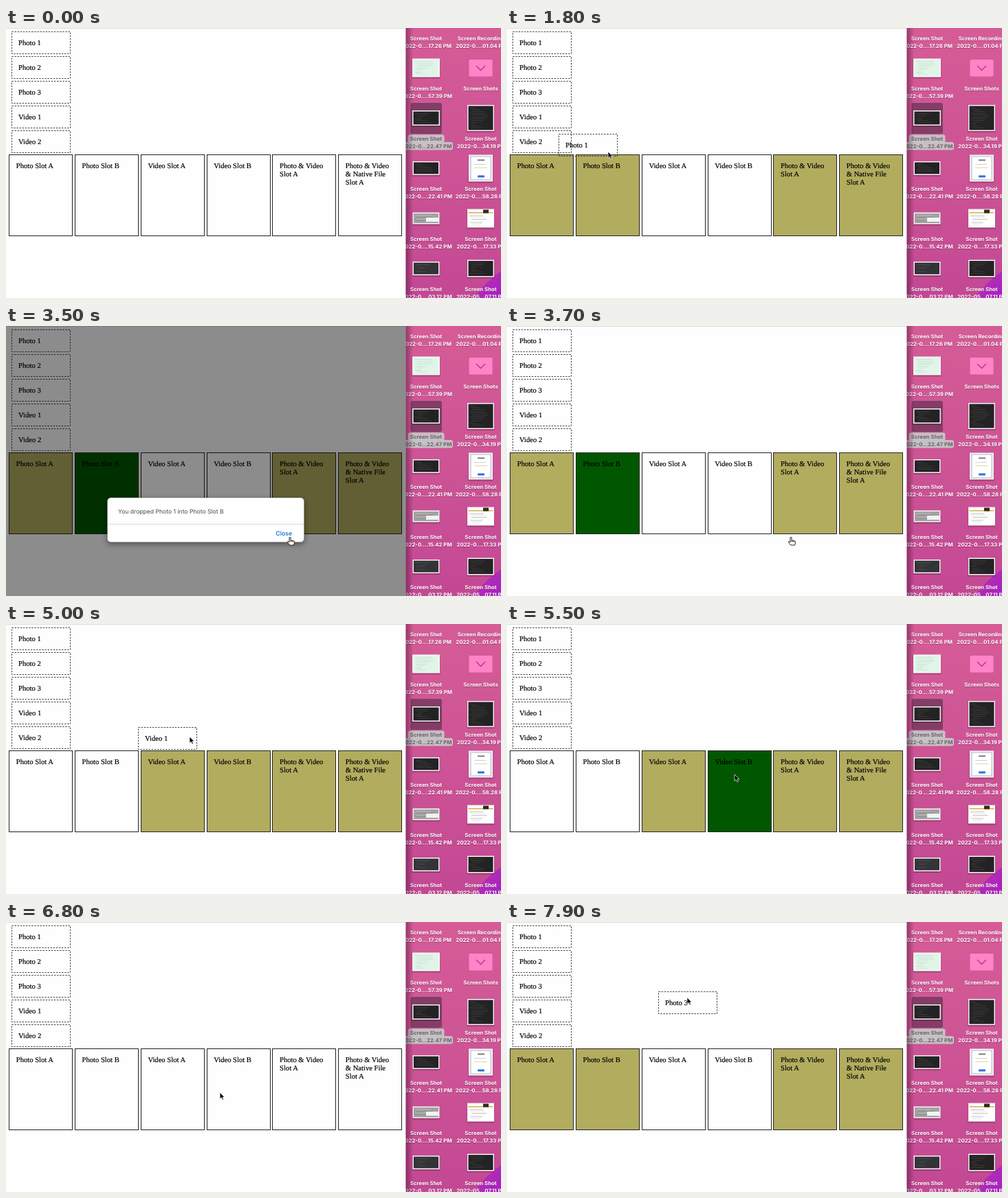
An HTML page for the animation above (8 s loop, 720 by 393 pixels).

```html
<!DOCTYPE html>
<html lang="en">
<head>
<meta charset="utf-8">
<title>Drag and drop slots</title>
<style>
  html, body { margin: 0; width: 100%; height: 100%; overflow: hidden; }
  svg { display: block; width: 100vw; height: 100vh; text-rendering: geometricPrecision; }
  .page { font: 10.6px "Liberation Serif", "Times New Roman", serif; }
  .page text { stroke: #000; stroke-width: .18; }
  .label { font: 700 7.8px Inter, sans-serif; fill: #fff; text-anchor: middle; }
  .shadow { fill: #5a1440; opacity: .5; }
  .selected { fill: #6c6469; }
  .dialog { font: 8.6px Inter, sans-serif; fill: #484848; }
  .close { font: 500 8.8px Inter, sans-serif; fill: #0a68d8; }
  .item rect { fill: none; stroke: #2c2c2c; stroke-width: .9; stroke-dasharray: 2.4 1.7; }
  .slot rect { stroke: #222; }
</style>
</head>
<body>
<svg id="stage" viewBox="0 0 720 393" preserveAspectRatio="none">
  <defs>
    <linearGradient id="wall" x1="0" y1="0" x2="0" y2="1">
      <stop offset="0" stop-color="#d55c96"/>
      <stop offset=".5" stop-color="#cd5495"/>
      <stop offset="1" stop-color="#c34894"/>
    </linearGradient>
    <linearGradient id="edge">
      <stop offset="0" stop-color="#300020" stop-opacity=".4"/>
      <stop offset="1" stop-color="#300020" stop-opacity="0"/>
    </linearGradient>
    <linearGradient id="violet" x1="0" y1="0" x2="1" y2="1">
      <stop offset="0" stop-color="#bd38a8"/>
      <stop offset="1" stop-color="#a51fc4"/>
    </linearGradient>
    <filter id="soft" x="-20%" y="-30%" width="140%" height="180%">
      <feDropShadow dx="0" dy="3" stdDeviation="4" flood-opacity=".45"/>
    </filter>
  </defs>
  <g id="desktop">
    <rect x="581" width="139" height="393" fill="url(#wall)"/>
    <path d="M681 393Q696 370 720 354V393Z" fill="url(#violet)"/>
  </g>
  <g id="page" class="page">
    <rect width="581.5" height="393" fill="#fefefe"/>
    <rect width="581.5" height="1" fill="#dcdcdc"/>
  </g>
  <rect x="581.5" width="11" height="393" fill="url(#edge)"/>
  <rect id="dim" width="581.5" height="393"/>
  <g id="dialog" class="dialog">
    <rect x="147.5" y="250" width="286" height="64.5" rx="5" fill="#fff" stroke="#777" stroke-width=".4" filter="url(#soft)"/>
    <path d="M148 288.5H433" stroke="#dadada"/>
    <text id="message" x="163" y="273.3"/>
    <text class="close" x="392.3" y="305">Close</text>
  </g>
  <path id="arrow" d="M0 0V9.3L2.2 7.4L3.8 10.8L5.4 10.1L3.9 6.8H6.8Z" fill="#000" stroke="#fff" stroke-width=".7"/>
  <path id="hand" d="M-1 1Q0-.6 1.1 1V5L5.6 6Q7 6.4 6.6 8L5.5 12H-.3L-3.7 7.7Q-3.8 6-2.2 6.7L-1 8ZM1.1 5V7M3 5.6V7.3M4.8 6V7.5" fill="#fff" stroke="#111" stroke-width=".9" stroke-linejoin="round"/>
</svg>
<script>
const $ = id => document.getElementById(id);
const LOOP = 8000, STEP = 100;
const OLIVE = '#b2ac5f', GREEN = '#005700', WHITE = '#fefefe';

function add(parent, tag, attrs = {}, text) {
  const node = document.createElementNS('http://www.w3.org/2000/svg', tag);
  for (const key in attrs) node.setAttribute(key, attrs[key]);
  if (text) node.textContent = text;
  return parent.appendChild(node);
}
const box = (parent, x, y, width, height, fill, more) =>
  add(parent, 'rect', { x, y, width, height, fill, ...more });
const show = (node, on) => node.setAttribute('visibility', on ? 'visible' : 'hidden');
const move = (node, x, y) => node.setAttribute('transform', `translate(${x} ${y})`);
const snap = v => Math.floor(v) + .5;

// Desktop
const desktop = $('desktop');

function label(x, y, text, selected) {
  if (!selected) add(desktop, 'text', { x, y: y + .8, class: 'label shadow' }, text);
  add(desktop, 'text', { x, y, class: selected ? 'label selected' : 'label' }, text);
}

function textLines(x, y, w, rows, colors, seed) {
  for (let i = 0; i < rows; i++) {
    const r = Math.abs(Math.sin((i + 1) * 12.9 + seed));
    box(desktop, x + (i % 3) * 1.5, y + i * 2.6, w * (.2 + .6 * r), .7, colors[i % colors.length], { opacity: .5 });
  }
}

function thumb(cx, cy, w, h, fill, ink, seed) {
  const x = cx - w / 2, y = cy - h / 2;
  box(desktop, x - .5, y + 1, w + 1, h + 1, '#40102c', { opacity: .3 });
  box(desktop, x, y, w, h, '#f6f6f6');
  box(desktop, x + 1.5, y + 1.5, w - 3, h - 3, fill);
  if (ink) textLines(x + 4, y + 4, w - 9, Math.floor((h - 6) / 2.6), ink, seed);
}

const DARK = '#232224', CODE = ['#77665a', '#557050', '#70555f'];
const LEFT = 611, RIGHT = 690.5;

thumb(LEFT, 58, 40, 27, '#e0f5e8', ['#91b7a1', '#b7c9be'], 1);
box(desktop, 588.5, 109, 45.5, 45, '#6a3557', { rx: 3, opacity: .75 });
thumb(LEFT, 131, 40, 22, DARK, CODE, 2);
thumb(LEFT, 204, 39, 20, DARK, CODE, 3);
thumb(LEFT, 277, 39, 17, '#a2a2a2', ['#ddd', '#666'], 4);
box(desktop, 611, 276, 18, 6, '#f2f2f2');
thumb(LEFT, 350, 39, 20, '#343337', ['#777', '#555'], 5);

box(desktop, 673.5, 46, 34, 24.5, '#ff83c7', { rx: 1.5 });
add(desktop, 'path', { d: 'M684 55L690.5 61.5L697 55', fill: 'none', stroke: '#a83c7c', 'stroke-width': 1.3 });
thumb(RIGHT, 131, 39, 38, DARK, CODE, 6);
thumb(RIGHT, 204, 35, 39, '#d5d8df');
box(desktop, 677, 188, 27, 32, '#fff', { rx: 1 });
box(desktop, 686, 191.5, 10, 1.6, '#666');
box(desktop, 681, 198, 17, .7, '#bbb');
box(desktop, 681, 203, 19, .7, '#d9c28a');
box(desktop, 686, 214.5, 10, 3, '#2d6fe0', { rx: 1 });
thumb(RIGHT, 277, 39, 27, '#fff');
box(desktop, 672.5, 268, 36, 1.6, '#d8b64a');
box(desktop, 694, 264.5, 8, 5, '#302a20');
textLines(674, 273, 28, 6, ['#555', '#bbb'], 7);
thumb(RIGHT, 350, 39, 25, DARK, CODE, 8);

box(desktop, 584.5, 155.3, 53, 12.5, '#c5c1c4', { rx: 3 });
box(desktop, 576, 166, 74, 11.5, '#c5c1c4', { rx: 3 });

const stamps = [
  ['0....17.26', '0....01.04'], ['0....57.39', ''], ['0...22.47', '0...34.19'],
  ['0....22.41', '0....58.28'], ['0....15.42', '0....17.33'], ['0....03.12', '05...07.11']
];
stamps.forEach((pair, row) => pair.forEach((stamp, col) => {
  const x = col ? RIGHT : LEFT, y = 18.3 + row * 73, selected = !col && row === 2;
  const name = !col || row ? 'Screen Shot' : 'Screen Recording';
  label(x, y, stamp ? name : 'Screen Shots', selected);
  if (stamp) label(x + 1, y + 10.5, `2022-${stamp} PM`, selected);
}));

// Page
const page = $('page');
const itemNames = ['Photo 1', 'Photo 2', 'Photo 3', 'Video 1', 'Video 2'];
const itemY = i => 5.5 + i * 36;

function makeItem(name, x, y) {
  const g = add(page, 'g', { class: 'item' });
  add(g, 'rect', { width: 85, height: 32 });
  const text = add(g, 'text', { x: 9.6, y: 19.2 }, name);
  move(g, x, y);
  return { g, text };
}

const slots = [
  ['Photo Slot A'], ['Photo Slot B'], ['Video Slot A'], ['Video Slot B'],
  ['Photo & Video', 'Slot A'], ['Photo & Video', '& Native File', 'Slot A']
].map((lines, i) => {
  const left = 4.7 + i * 95.8, x = snap(left), g = add(page, 'g', { class: 'slot' });
  const rect = box(g, x, 184.5, 92, 118, WHITE);
  lines.forEach((line, n) => add(g, 'text', { x: left + 10.1, y: 204.1 + n * 11.8 }, line));
  return { rect, x, name: lines[0] };
});
itemNames.forEach((name, i) => makeItem(name, 8.5, itemY(i)));
const ghost = makeItem('', 0, 0);

// Timeline
const drags = [
  { start: 1000, drop: 2500, open: 2700, close: 3700, click: 3200, item: 0, slot: 1, accepts: [0, 1, 4, 5], grab: [80, 31] },
  { start: 4500, drop: 5500, open: 5600, close: 6600, click: 6300, item: 3, slot: 3, accepts: [2, 3, 4, 5], grab: [83, 127] },
  { start: 7300, drop: LOOP, open: LOOP, close: LOOP, click: LOOP, item: 2, slot: 0, accepts: [0, 1, 4, 5], grab: [50, 86] }
];
const track = [
  [0, 640, 410], [800, 80, 31], [1000, 80, 31], [1800, 147, 180], [2400, 158, 228],
  [2700, 162, 232], [3200, 413, 307], [3700, 413, 307], [4400, 83, 127], [4500, 83, 127],
  [5000, 267, 164], [5400, 330, 218], [5600, 332, 220], [6300, 402.5, 305], [6600, 402.5, 305],
  [7200, 50, 86], [7300, 50, 86], [7900, 262, 110], [8000, 270, 111]
];

function cursorAt(t) {
  const i = track.findIndex((key, n) => n && t <= key[0]);
  const [t0, x0, y0] = track[i - 1], [t1, x1, y1] = track[i];
  const p = (t - t0) / (t1 - t0), e = p * p * (3 - 2 * p);
  return [x0 + (x1 - x0) * e, y0 + (y1 - y0) * e];
}

function render(t) {
  const [x, y] = cursorAt(t);
  const drag = drags.find(d => t >= d.start && t <= d.close);
  const dragging = drag && t < drag.drop;
  const alerting = drag && t >= drag.open && t < drag.close;
  const pointing = drag && t >= drag.click;

  slots.forEach(({ rect, x: left }, i) => {
    const lit = drag && drag.accepts.includes(i);
    const over = dragging ? x > left && x < left + 92 && y > 184 && y < 303 : drag && drag.slot === i;
    rect.setAttribute('fill', !lit ? WHITE : over ? GREEN : OLIVE);
  });

  show(ghost.g, dragging);
  if (dragging) {
    ghost.text.textContent = itemNames[drag.item];
    move(ghost.g, snap(8.5 + x - drag.grab[0]), snap(itemY(drag.item) + y - drag.grab[1]));
  }

  show($('dialog'), alerting);
  show($('dim'), alerting);
  if (alerting) {
    const fade = t === drag.open ? .5 : 1;
    $('dim').setAttribute('opacity', .45 * fade);
    $('dialog').setAttribute('opacity', fade);
    $('message').textContent = `You dropped ${itemNames[drag.item]} into ${slots[drag.slot].name}`;
  }

  show($('arrow'), !pointing);
  show($('hand'), pointing);
  move(pointing ? $('hand') : $('arrow'), x, y);
}

const began = performance.now();
function tick() {
  const t = (performance.now() - began) % LOOP;
  render(Math.floor(t / STEP) * STEP);
  requestAnimationFrame(tick);
}
tick();
</script>
</body>
</html>
```
